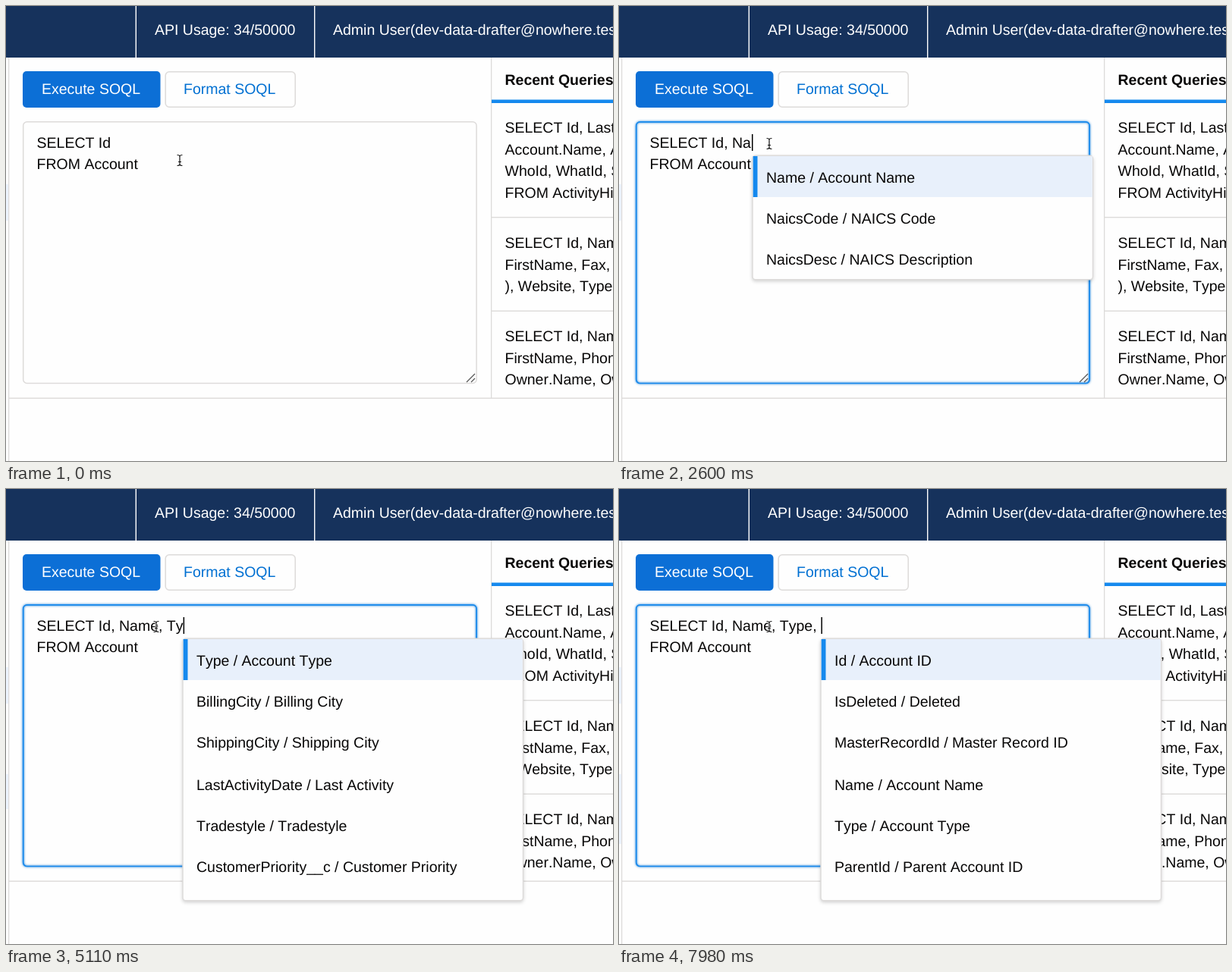
Animation of 800 by 600 pixels, one loop 8 s. Source, as an HTML page:

```html
<!DOCTYPE html>
<html lang="en">
<head>
<meta charset="utf-8">
<title>Query builder autocomplete</title>
<style>
  html, body { margin: 0; width: 100%; height: 100%; overflow: hidden; background: #fefefe; }
  svg { display: block; }
  text {
    font: 19.5px "Liberation Sans", Arial, sans-serif;
    font-kerning: none;
    text-rendering: geometricPrecision;
    white-space: pre;
    fill: #080707;
  }
  .bar { fill: #16325c; }
  .light { fill: #fff; }
  .link { fill: #0070d2; }
  .bold { font-weight: 700; }
  .line { fill: #dddbda; }
  .box { fill: #fefefe; stroke: #dddbda; stroke-width: 1.5; }
  .blue { fill: #1589ee; }
  .mark { fill: #ecf3fe; }
  .focus { fill: none; stroke: #1589ee; stroke-width: 1.7; filter: drop-shadow(0 0 1.6px #0070d2); }
  #menu .box { filter: drop-shadow(0 2px 2px rgba(0, 0, 0, .17)); }
</style>
</head>
<body>
<svg id="stage" width="800" height="600" viewBox="0 0 800 600">
  <rect width="800" height="600" fill="#fefefe"/>

  <rect class="mark" y="235" width="3" height="48"/>
  <rect class="mark" id="field1" y="376" width="3" height="46"/>
  <rect class="mark" id="field2" y="422" width="3" height="46"/>
  <rect class="line" x="3" y="68" width="1.3" height="532"/>
  <rect class="line" x="4" y="516.5" width="796" height="1.4"/>
  <rect class="line" x="639" y="68" width="1.3" height="449"/>

  <rect class="bar" width="800" height="68"/>
  <rect class="light" x="170.6" width="1.4" height="68"/>
  <rect class="light" x="406" width="1.4" height="68"/>
  <text class="light" x="196" y="38">API Usage: 34/50000</text>
  <text class="light" x="431" y="38">Admin User(dev-data-drafter@nowhere.test)</text>

  <rect x="22" y="86" width="181.5" height="48" rx="5" fill="#0c6fd6"/>
  <text class="light" x="47" y="116">Execute SOQL</text>
  <rect class="box" x="210.2" y="86.7" width="171" height="46.6" rx="5"/>
  <text class="link" x="234" y="116">Format SOQL</text>

  <text class="bold" x="657.5" y="104">Recent Queries</text>
  <rect class="blue" x="640" y="123.5" width="160" height="4.5"/>
  <rect class="line" x="640" y="278" width="160" height="1.4"/>
  <rect class="line" x="640" y="401.5" width="160" height="1.4"/>
  <g id="recent"></g>

  <rect class="box" x="22.7" y="152.8" width="597.4" height="344.7" rx="5"/>
  <rect class="focus" id="focus" x="22.7" y="152.8" width="597.4" height="344.7" rx="5"/>
  <path d="M607 496 618 485M613 496 618 491" stroke="#555" stroke-width="1.2"/>
  <text id="query" x="40.6" y="187"></text>
  <text x="40.6" y="215">FROM Account</text>
  <rect id="caret" y="169" width="1.5" height="22"/>
  <g id="menu"></g>

  <g id="pointer" fill="none" stroke-linecap="round">
    <path id="beam" d="M-3 -7Q-.5 -7 0 -5.5Q.5 -7 3 -7M0 -5.5V5.5M-3 7Q-.5 7 0 5.5Q.5 7 3 7M-1.5 2H1.5" stroke="#fff" stroke-width="2.4"/>
    <use href="#beam"/>
    <path d="M-3 -7Q-.5 -7 0 -5.5Q.5 -7 3 -7M0 -5.5V5.5M-3 7Q-.5 7 0 5.5Q.5 7 3 7M-1.5 2H1.5" stroke="#111" stroke-width="1.2"/>
  </g>
</svg>
<script>
  const LOOP = 8000;
  const $ = id => document.getElementById(id);
  const label = (x, y, s) => `<text x="${x}" y="${y}">${s}</text>`;

  const recent = [
    [167, "SELECT Id, LastName, Name,", "Account.Name, AccountId,", "WhoId, WhatId, Subject", "FROM ActivityHistories"],
    [319, "SELECT Id, Name, (SELECT", "FirstName, Fax, Email", "), Website, Type"],
    [442, "SELECT Id, Name, (SELECT", "FirstName, Phone),", "Owner.Name, OwnerId"]
  ];
  $("recent").innerHTML = recent.map(([y, ...rows]) =>
    rows.map((s, i) => label(657.5, Math.round(y + i * 28.6), s)).join("")).join("");

  const name = "Name / Account Name", type = "Type / Account Type";
  const parent = "ParentId / Parent Account ID", deleted = "IsDeleted / Deleted";
  const master = "MasterRecordId / Master Record ID";
  const street = "BillingStreet / Billing Street", city = "BillingCity / Billing City";

  // left edge, then the suggestions
  const menus = {
    n: [165, name, parent, street, city, "BillingState / Billing State/Province",
      "BillingPostalCode / Billing Zip/Postal Code"],
    na: [176, name, "NaicsCode / NAICS Code", "NaicsDesc / NAICS Description"],
    t: [224.5, deleted, master, type, parent, street, city],
    ty: [233, type, city, "ShippingCity / Shipping City", "LastActivityDate / Last Activity",
      "Tradestyle / Tradestyle", "CustomerPriority__c / Customer Priority"],
    all: [266, "Id / Account ID", deleted, master, name, type, parent]
  };

  function menuMarkup(key) {
    if (!key) return "";
    const [x, ...items] = menus[key];
    const height = items.length > 3 ? 345.5 : 163.5;
    return `<rect class="box" x="${x}" y="197.3" width="448.5" height="${height}" rx="4"/>
      <rect x="${x + .7}" y="198" width="447" height="54" fill="#e8f0fb"/>
      <rect class="blue" x="${x + .7}" y="198" width="5.8" height="54"/>` +
      items.map((s, i) => label(x + 18, 233 + 54 * i + (i > 2 ? 2 : 0), s)).join("");
  }

  // time, typed fields, caret x (0 = hidden), menu, marked fields
  const steps = [
    [0, "Id", 0, "", 0],
    [820, "Id", 139.2, "", 0],
    [1290, "Id", 0, "", 0],
    [1530, "Id,", 144.8, "", 0],
    [1770, "Id, ", 149.3, "", 0],
    [2240, "Id, N", 164.3, "", 0],
    [2360, "Id, N", 164.3, "n", 0],
    [2480, "Id, Na", 175, "n", 0],
    [2600, "Id, Na", 175, "na", 0],
    [2960, "Id, Name", 202.2, "", 0],
    [3080, "Id, Name", 202.2, "", 1],
    [3560, "Id, Name,", 208, "", 1],
    [4040, "Id, Name, ", 212.4, "", 1],
    [4510, "Id, Name, ", 0, "", 1],
    [4750, "Id, Name, T", 224.4, "", 1],
    [4990, "Id, Name, T", 224.4, "t", 1],
    [5110, "Id, Name, Ty", 233.6, "ty", 1],
    [5470, "Id, Name, Type", 254.8, "", 2],
    [5830, "Id, Name, Type,", 260.6, "", 2],
    [5940, "Id, Name, Type, ", 266.4, "", 2],
    [6540, "Id, Name, Type, ", 0, "", 2],
    [7020, "Id, Name, Type, ", 266.4, "all", 2],
    [7500, "Id, Name, Type, ", 0, "all", 2],
    [7980, "Id, Name, Type, ", 266.4, "all", 2]
  ];

  // time, share of the pointer's way
  const moves = [[0, 0], [110, .12], [230, .42], [350, .75], [470, .94], [580, 1]];
  const fades = [[0, 0], [820, .6], [930, 1]];
  const at = (table, t) => table.findLast(row => row[0] <= t);

  let shown;
  function draw(t) {
    const step = at(steps, t);
    const way = at(moves, t)[1];
    $("pointer").setAttribute("transform", `translate(${229 - 31 * way} ${203.5 - 22 * way})`);
    $("focus").setAttribute("opacity", at(fades, t)[1]);
    if (step === shown) return;
    shown = step;
    const [, fields, caret, menu, marked] = step;
    $("query").textContent = "SELECT " + fields;
    $("caret").setAttribute("x", caret);
    $("caret").setAttribute("opacity", caret ? 1 : 0);
    $("menu").innerHTML = menuMarkup(menu);
    $("field1").setAttribute("opacity", marked > 0 ? 1 : 0);
    $("field2").setAttribute("opacity", marked > 1 ? 1 : 0);
  }

  const start = performance.now();
  function tick() {
    draw((performance.now() - start) % LOOP);
    requestAnimationFrame(tick);
  }
  tick();
</script>
</body>
</html>
```
